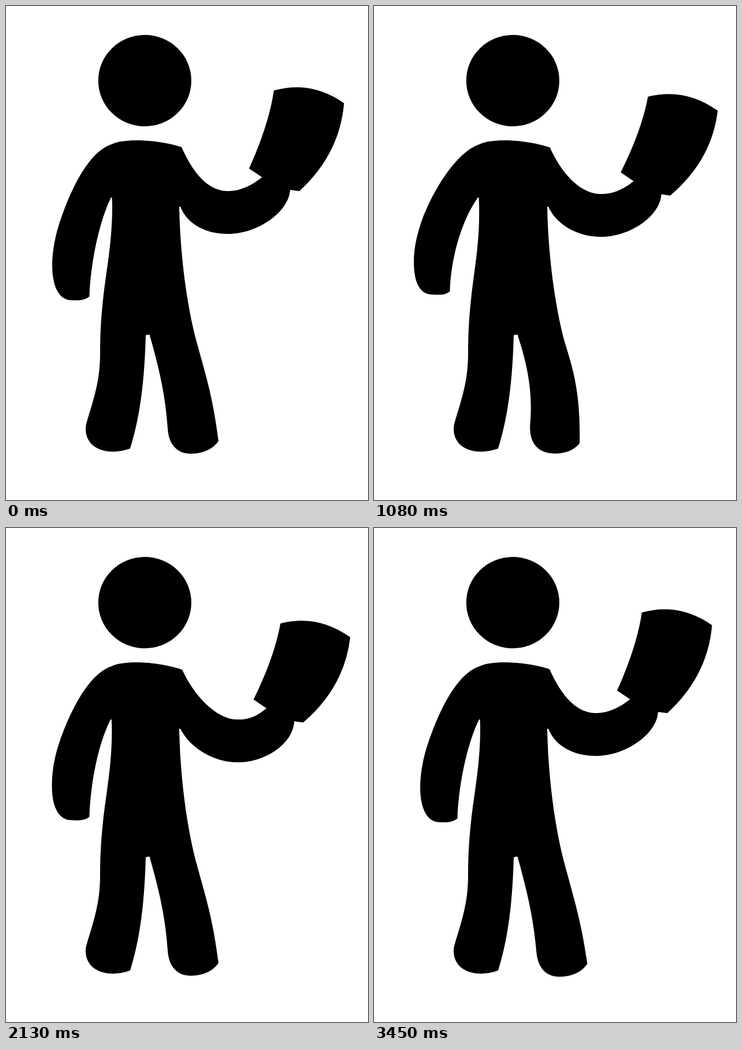
These frames come from a looping animation (627 px wide and 854 px high, 3.51 s). An HTML page:

```html
<!DOCTYPE html>
<html lang="en">
<head>
<meta charset="utf-8">
<title>Waving figure</title>
<style>
html, body { margin: 0; width: 100%; height: 100%; overflow: hidden; background: #fff; }
svg { display: block; width: 100vw; height: 100vh; }
</style>
</head>
<body>
<svg viewBox="0 0 627 854">
  <ellipse cx="240.4" cy="129" rx="80.6" ry="79"/>
  <path id="body"/>
  <path id="paper" d="M464,146 Q528,128 585.5,168 Q578,256 508,320 L492,318 443.5,296 421,281 Q455,206 464,146 Z"/>
</svg>
<script>
const LOOP = 3510, STEP = 30, LAST = 3450;
const body = document.getElementById('body');
const paper = document.getElementById('paper');

// Key poses, eased in and out: time, then the values named in draw()
const HAND = [[0, 0, 0, 0], [780, 6.3, -1, .1], [1230, 5.5, 10, 1],
  [1980, 7, 14.7, .6], [2610, 8.9, 23, .9], [2745, 8.9, 23, .9], [LAST, 0, 0, 0]];
const SWING = [[0, 0, 0], [840, 16.5, 9.3], [1530, 0, 10.8], [2490, 0, 0]];
const LEG = [[0, 0, 0], [1560, 1, 0], [2130, 0, 0], [2500, -.1, 1], [3270, -.1, 1.7]];

function pose(keys, t) {
  const i = keys.findIndex(k => k[0] > t);
  if (i < 0) return keys[keys.length - 1].slice(1);
  const a = keys[i - 1], b = keys[i];
  const u = (t - a[0]) / (b[0] - a[0]), e = u * u * (3 - 2 * u);
  return a.slice(1).map((v, j) => v + (b[j + 1] - v) * e);
}

const pt = (x, y) => x.toFixed(2) + ',' + y.toFixed(2) + ' ';
const joint = (dx, dy) => (x, y, share = 1) => pt(x + dx * share, y + dy * share);

function draw(t) {
  const [hx, hy, tilt] = pose(HAND, t);
  const [swing, lift] = pose(SWING, t);
  const [bend, drop] = pose(LEG, t);

  // raised arm: the elbow follows the sinking hand
  const hand = joint(hx, hy);
  const elbow = joint(.35 * hx + .8 * hy, .7 * hy);
  // hanging arm: lifting the hand pushes the elbow outwards
  const upper = joint(-.5 * lift - .53 * swing, 0);
  const side = joint(-.15 * lift - .8 * swing, -.6 * lift);
  const palm = joint(-swing, -lift);
  const tip = joint(-1.1 * swing, -.9 * lift);
  const pit = joint(-.2 * lift, 0);
  // front leg: the foot slides and turns about its middle
  const knee = joint(0, -8 * bend + drop / 2);
  const foot = (x, y) => pt(
    x - bend * (14 + .125 * (y - 741)),
    y + bend * (.13 * (x - 324) - .5) + drop);

  paper.setAttribute('transform',
    `translate(${465 + hx} ${300 + hy}) rotate(${1.7 * tilt}) skewX(${-.7 * tilt}) ` +
    `scale(1 ${1 - .03 * tilt}) translate(-465 -300)`);

  body.setAttribute('d',
    'M' + elbow(304, 244, .08) +
    'C' + elbow(326, 293, .08) + elbow(352, 320) + elbow(385, 320) +
    'C' + elbow(406, 320) + hand(426, 310) + hand(443.5, 296) +
    'L' + hand(456, 287) + hand(488, 300) + hand(492, 318) +
    'C' + hand(490, 356) + elbow(436, 394) + elbow(385, 394) +
    'C' + elbow(345, 394) + elbow(314, 377, .3) + '302,347 ' +
    // front leg
    'L300,347 C302,440 315,525 330,580 ' +
    'C' + knee(344, 632) + knee(358, 672) + foot(368, 752) +
    'C' + foot(358, 767) + foot(340, 774) + foot(320, 774) +
    'C' + foot(300, 774) + foot(282, 762) + foot(280, 730) +
    'C' + knee(276, 670) + knee(264, 622) + '248.5,568 ' +
    // back leg and side
    'L242,569 C240,645 233,708 215,765 ' +
    'C180,778 138,768 138,731 Q138,724 140.5,717 ' +
    'C156,668 163,640 163,600 C163,486 184,440 ' + pit(184, 345) +
    'L' + pit(183.5, 331) + pit(182, 331) +
    // hanging arm
    'C' + upper(160, 375) + tip(146, 450) + tip(144.5, 502) +
    'C' + tip(138, 508) + palm(128, 509.5) + palm(112, 508.5) +
    'C' + palm(95, 508) + side(80, 490) + side(80, 448) +
    'C' + side(80, 425) + upper(85, 396) + upper(95, 368) +
    'C' + upper(110, 325, .9) + '140,253 183,239 ' +
    'C205,228 264,231 ' + elbow(304, 244, .08) + 'Z');
}

function tick(now) {
  const t = Math.floor(now % LOOP / STEP) * STEP;
  draw(t < 2 * STEP ? 0 : Math.min(t, LAST));
  requestAnimationFrame(tick);
}
draw(0);
requestAnimationFrame(tick);
</script>
</body>
</html>
```
